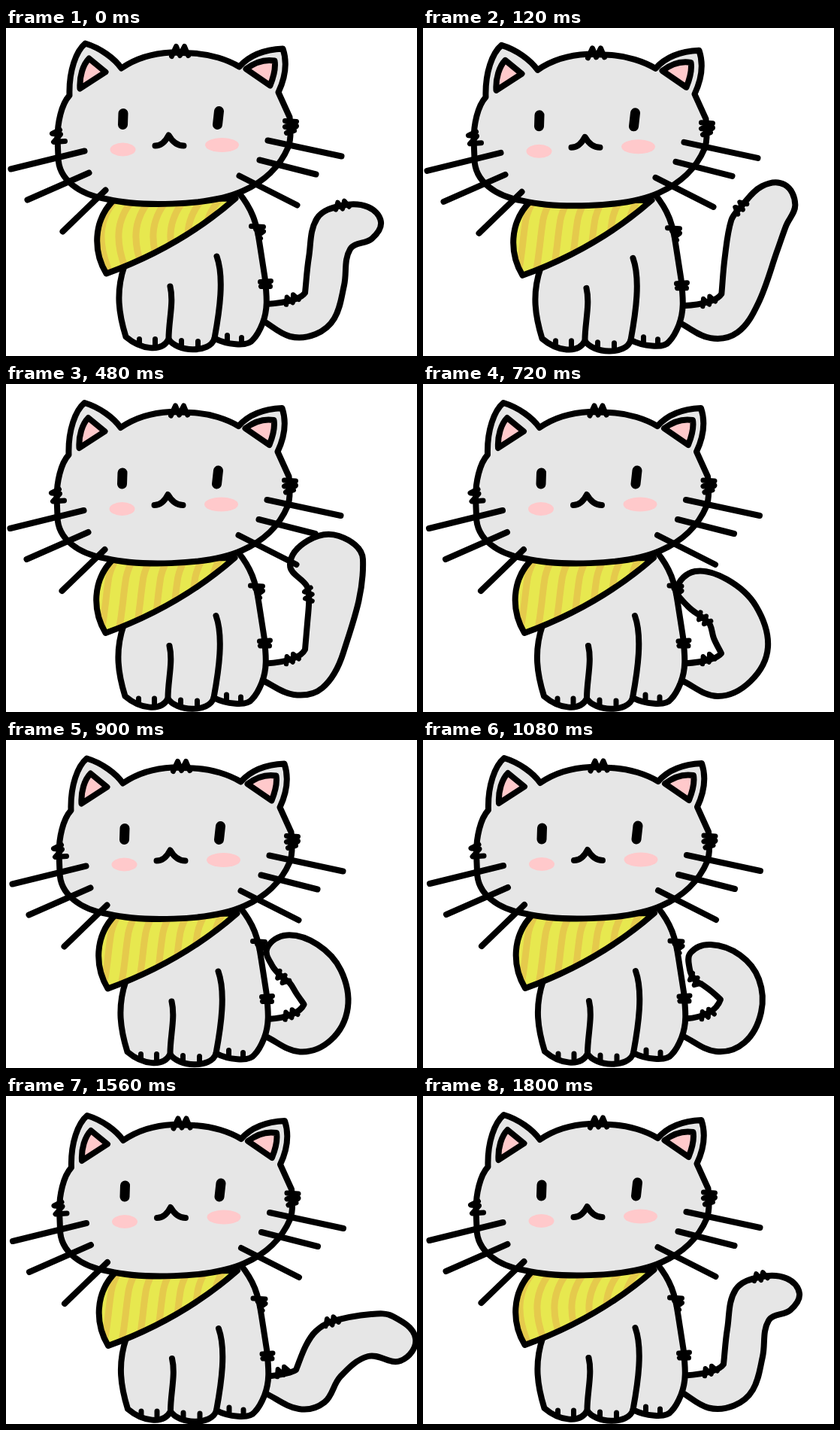
Recreate the animation shown at these times as an HTML page. Size 547 by 436 pixels, loop 1.92 s.

```html
<!DOCTYPE html>
<html lang="en">
<head>
<meta charset="utf-8">
<title>Cat wagging its tail</title>
<style>
  html, body { margin: 0; width: 100%; height: 100%; overflow: hidden; background: #fff; }
  svg { display: block; width: 100vw; height: 100vh; }
  .ink { fill: none; stroke: #000; stroke-width: 8; stroke-linecap: round; stroke-linejoin: round; }
  .fur { fill: #e6e6e6; }
  .pink { fill: #ffc9cb; }
  .tuft { stroke-width: 7; }
</style>
</head>
<body>
<svg viewBox="0 0 547 436">
  <defs>
    <path id="cloth" d="M147 231C117 260 119 302 136 330C205 305 260 272 308 230Z"/>
    <clipPath id="inside"><use href="#cloth"/></clipPath>
    <path id="zig" d="M-10 4L-5 -6L0 5L5 -6L10 4"/>
  </defs>

  <g class="ink">
    <path id="tail" class="fur"/>
    <use id="elbowTuft" class="tuft" href="#zig"/>
    <use id="tipTuft" class="tuft" href="#zig"/>
  </g>

  <g id="cat" class="ink">
    <path class="fur" d="M312 222C330 244 336 262 340 290L347 335C350 362 351 378 344 396Q338 411 331 418C324 428 295 424 280 416C274 437 229 434 219 417C210 435 182 431 162 414C153 385 148 355 160 320L180 230Z"/>
    <path d="M283 307C293 335 287 378 280 416M221 347C226 368 219 393 219 416"/>
    <path class="tuft" d="M180 417v7M201 417v7M236 419v7M258 420v6M297 412v6M316 415v6"/>
    <path class="tuft" d="M329 267L345 268L335 271L345 274L338 279L341 283M341 341L355 340L342 347L354 347"/>

    <use href="#cloth" fill="#e7e84f" stroke="none"/>
    <g clip-path="url(#inside)"><path id="stripes" stroke="#e5ca4c" stroke-width="9"/></g>
    <use href="#cloth"/>

    <path class="fur" d="M87 93C86 60 96 34 108 24C128 30 147 44 156 57C178 42 200 37 222 36L250 37C275 38 298 46 313 55C328 38 348 32 371 31C378 52 373 72 365 89L380 122Q383 150 378 162C367 188 345 208 318 220C270 242 175 240 137 231C100 225 72 205 72 175L71 150C71 130 76 105 87 93Z"/>
    <path class="pink" d="M113 44L135 62L101 84C100 68 105 52 113 44ZM322 58C335 48 348 45 360 47C362 58 358 70 354 80Z"/>
    <path class="tuft" d="M223 41L229 28L234 40L240 28L245 40M374 127L389 128L374 135L389 134L376 143L386 140M74 139L64 144L75 145L66 155L81 154"/>

    <g class="pink" stroke="none">
      <ellipse cx="158" cy="165" rx="17" ry="9"/>
      <ellipse cx="290" cy="159" rx="22.5" ry="9.5"/>
    </g>
    <path stroke-width="13" d="M158.500 117L158 132M286 114L284 132"/>
    <path d="M201 160Q212 160 219 146Q227 160 239 160"/>
    <path d="M9 191L107 167M31 232L113 196M78 274L135 219M351 153L449 174M340 179L415 198M313 200L390 239"/>
  </g>
</svg>

<script>
const LOOP = 1920;
const starts = [0, 60, 120, 240, 360, 480, 600, 720, 900, 1080, 1200, 1320, 1440, 1560, 1680, 1800];

// Each pose: step, body shift, tail outline from inner elbow round the tip to the underside.
const outlines = [
  [0, -2.5, -3.5, '398,352 403,305 414,253 447,236 482,238 499,258 487,280 458,294 450,342 437,386 412,407 378,410'],
  [3, -4, 0, '397,354 401,305 409,257 418,241 436,206 464,190 491,208 489,238 470,270 449,356 422,403 385,413'],
  [5, -3.5, 1, '398,353 401,318 403,294 403,280 400,268 378,240 402,208 443,202 475,233 449,357 421,404 383,413'],
  [7, -1, 1, '397,358 387,338 382,320 374,312 352,295 338,272 362,249 405,260 443,295 459,350 436,395 392,415'],
  [9, 0, 0, '396,345 385,335 373,326 362,319 355,305 356,283 383,272 422,286 447,318 450,362 428,402 390,414'],
  [13, 0, 2, '386,364 399,332 412,313 433,300 486,290 515,293 545,322 525,352 482,346 445,373 424,407 390,416']
];

const add = (a, b) => [a[0] + b[0], a[1] + b[1]];
const sub = (a, b) => [a[0] - b[0], a[1] - b[1]];
const scale = (a, k) => [a[0] * k, a[1] * k];
const lerp = (a, b, k) => add(a, scale(sub(b, a), k));
const $ = id => document.getElementById(id);

// Blend two vectors by length and shortest turn.
function swing(a, b, k) {
  const from = Math.atan2(a[1], a[0]);
  const turn = Math.atan2(a[0] * b[1] - a[1] * b[0], a[0] * b[0] + a[1] * b[1]);
  const size = Math.hypot(...a) * (1 - k) + Math.hypot(...b) * k;
  return [Math.cos(from + turn * k) * size, Math.sin(from + turn * k) * size];
}

// Split an outline into spine steps and half widths.
function makePose(step, shift, pts) {
  const ring = [add([349.5, 370.5], shift), ...pts, add([345, 393], shift)];
  const spine = [], half = [];
  for (let i = 0; i < 7; i++) {
    spine.push(lerp(ring[i], ring[13 - i], .5));
    half.push(scale(sub(ring[i], ring[13 - i]), .5));
  }
  return { step, shift, root: spine[0], bones: spine.slice(1).map((p, i) => sub(p, spine[i])), half };
}

const poses = outlines.map(([step, x, y, text]) =>
  makePose(step, [x, y], text.split(' ').map(p => p.split(',').map(Number))));
poses.push({ ...poses[0], step: 15, shift: [-.5, 1], root: add(poses[0].root, [2, 4.5]) });
poses.push({ ...poses[0], step: 16 });

function tailRing(a, b, k) {
  let spot = lerp(a.root, b.root, k);
  const inner = [], outer = [];
  for (let i = 0; i < 7; i++) {
    if (i) spot = add(spot, swing(a.bones[i - 1], b.bones[i - 1], k));
    const half = swing(a.half[i], b.half[i], k);
    inner.push(add(spot, half));
    outer.unshift(sub(spot, half));
  }
  return inner.concat(outer);
}

function tailPath(ring) {
  const handle = (i, len) => {
    const d = sub(ring[Math.min(i + 1, 13)], ring[i === 1 ? 1 : i - 1]);
    return scale(d, len / (Math.hypot(...d) || 1));
  };
  let d = `M${ring[0]}Q${[ring[1][0] - 8, ring[0][1] - 3]} ${ring[1]}`;
  for (let i = 1; i < 13; i++) {
    const p = ring[i], q = ring[i + 1];
    const len = Math.hypot(...sub(q, p)) * .35;
    d += `C${add(p, handle(i, len))} ${sub(q, handle(i + 1, len))} ${q}`;
  }
  return d;
}

function place(id, [x, y], deg, size) {
  $(id).setAttribute('transform', `translate(${x} ${y}) rotate(${deg}) scale(${size})`);
}

function stripePath(round) {
  let d = '';
  for (let x = 152; x < 320; x += 23) {
    d += round
      ? `M${x} 228C${x - 26} 255 ${x - 28} 285 ${x - 14} 322`
      : `M${x} 228Q${x - 10} 245 ${x - 12} 258T${x - 16} 290T${x - 22} 330`;
  }
  return d;
}

let shown = -1;
function draw(step) {
  if (step === shown) return;
  shown = step;
  const n = poses.findIndex(p => p.step > step);
  const a = poses[n - 1], b = poses[n];
  const k = (step - a.step) / (b.step - a.step);
  const ring = tailRing(a, b, k);
  const along = sub(ring[5], ring[3]);

  $('tail').setAttribute('d', tailPath(ring));
  place('elbowTuft', [ring[1][0] - 18, ring[0][1] - 6], -22, .9);
  place('tipTuft', ring[4], Math.atan2(along[1], along[0]) * 180 / Math.PI, .9);
  $('cat').setAttribute('transform', `translate(${lerp(a.shift, b.shift, k)})`);
  $('stripes').setAttribute('d', stripePath(step < 2 || step === 15));
}

function tick(now) {
  const t = now % LOOP;
  let step = starts.length - 1;
  while (starts[step] > t) step--;
  draw(step);
  requestAnimationFrame(tick);
}
draw(0);
requestAnimationFrame(tick);
</script>
</body>
</html>
```
